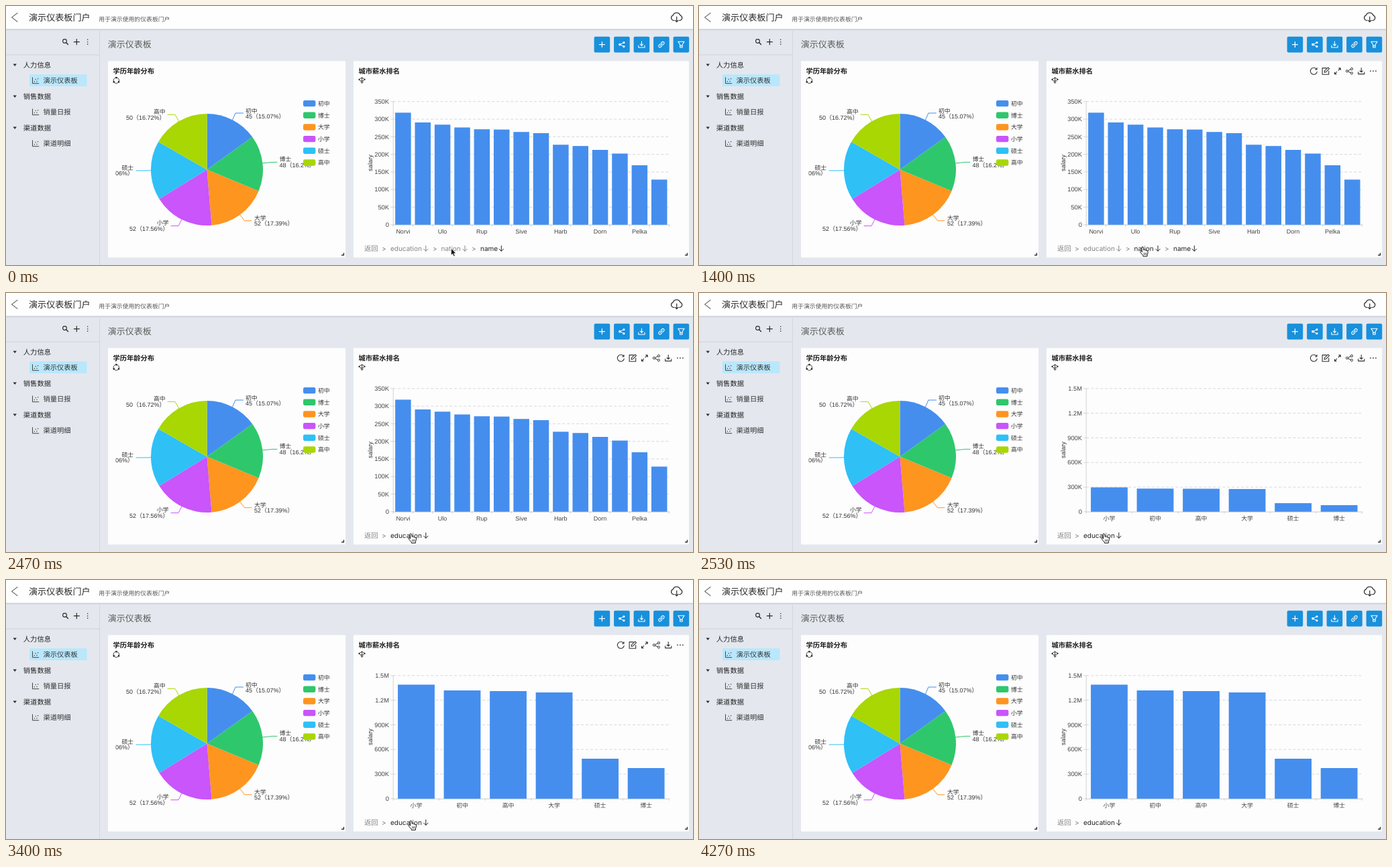
Animation, 1024 px wide and 387 px high, one loop 4.39 s. Source, as an HTML page:

```html
<!DOCTYPE html>
<html lang="zh-CN">
<head>
<meta charset="utf-8">
<title>演示仪表板门户</title>
<style>
html, body { margin: 0; width: 100%; height: 100%; overflow: hidden; background: #e4e8ee; }
svg { display: block; }
text { font-family: "Liberation Sans", "Noto Sans CJK SC", "Noto Sans CJK", sans-serif; text-rendering: geometricPrecision; white-space: pre; }
.ui { font-family: "Inter", "Noto Sans CJK SC", "Noto Sans CJK", sans-serif; }
.line { fill: none; stroke-linecap: round; stroke-linejoin: round; }
</style>
</head>
<body>
<svg id="stage" width="1024" height="387" viewBox="0 0 1024 387" xmlns="http://www.w3.org/2000/svg"></svg>
<script>
const LOOP = 4390, STEP = 1000 / 15;
const BLUE = '#458eee', INK = '#2b2b2b', GREY = '#858585';

const rect = (x, y, w, h, fill, rx = 0) =>
  `<rect x="${x}" y="${y}" width="${w}" height="${h}" fill="${fill}" rx="${rx}"/>`;
const line = (d, stroke, width = 1, extra = '') =>
  `<path class="line" d="${d}" stroke="${stroke}" stroke-width="${width}" ${extra}/>`;
const dot = (x, y, r, fill) => `<circle cx="${x}" cy="${y}" r="${r}" fill="${fill}"/>`;
const text = (x, y, size, fill, str, extra = '') =>
  `<text x="${x}" y="${y}" font-size="${size}" fill="${fill}" ${extra}>${str}</text>`;
const at = (x, y, body) => `<g transform="translate(${x} ${y})">${body}</g>`;
const END = 'text-anchor="end"', MID = 'text-anchor="middle"';

// Icons are centred on 0,0
const icon = {
  plus: c => line('M-4 0H4M0-4V4', c, 1.2),
  share: c => line('M3-3L-3 0L3 3', c) + dot(-3, 0, 1.8, c) + dot(3, -3, 1.6, c) + dot(3, 3, 1.6, c),
  shareOpen: c => line('M2-2.4L-2.2-.6M2 2.6L-2.2.7', c) +
    [[-3.6, 0], [3.4, -3.2], [3.4, 3.2]].map(([x, y]) =>
      `<circle cx="${x}" cy="${y}" r="1.6" fill="none" stroke="${c}"/>`).join(''),
  download: c => line('M-4.6 1.5V4.4H4.6V1.5M0-4.6V1.6M-2-.4L0 1.7L2-.4', c, 1.1),
  link: c => line('M-.8-2L1-3.8A2 2 0 0 1 3.8-1L2 .8M.8 2L-1 3.8A2 2 0 0 1-3.8 1L-2-.8M-1.4 1.4L1.4-1.4', c, 1.1),
  filter: c => line('M-4.6-4.4H4.6L1.7.2V4.4H-1.7V.2ZM-1.7 1.8H1.7', c, 1.1),
  reload: c => line('M4.2-2.6A5 5 0 1 0 4.9 1M4.6-4.6V-2.2H2.2', c, 1.1),
  edit: c => line('M1-4.6H-5V5H4.6V0M-2 2L-1.5-.5L3.6-5.4L5.4-3.6L.4 1.5Z', c, 1.1),
  expand: c => line('M1.2-1.2L4.4-4.4M1.8-4.4H4.4V-1.8M-1.2 1.2L-4.4 4.4M-1.8 4.4H-4.4V1.8', c, 1.1),
  more: c => [-4, 0, 4].map(x => dot(x, 0, .85, c)).join(''),
  chart: c => line('M-4.5-4.5V4.3H4.8', c, 1) +
    [[-1.6, 1.4], [.2, -2], [2, 1], [3.6, -2.6]].map(([x, y]) => dot(x, y, .75, c)).join(''),
  caret: c => `<path d="M-2.7-1.6H2.7L0 1.9Z" fill="${c}"/>`,
  down: c => line('M0-4V3.8M-3.2.8L0 4L3.2.8', c, 1)
};

function header() {
  return rect(0, 0, 1024, 34.3, '#fefefe') + rect(0, 34.3, 1024, 3, 'url(#shade)') +
    line('M17 10.5L8.6 17L17 23.5', '#777', 1.2) +
    text(34, 22.4, 13.1, '#262626', '演示仪表板门户') +
    text(138.3, 23.2, 8.85, '#555', '用于演示使用的仪表板门户') +
    at(999.7, 17, line('M-4 4.5H-5A4 4 0 0 1-5.4-3.2A5.6 5.6 0 0 1 5.2-3.2A4 4 0 0 1 5 4.5H4M0-1V6.6M-2.4 4.4L0 6.8L2.4 4.4', '#333', 1.25));
}

function sidebar() {
  const groups = [['人力信息', '演示仪表板'], ['销售数据', '销量日报'], ['渠道数据', '渠道明细']];
  return rect(139, 37, 1, 350, '#d3d7dd') + rect(0, 72.5, 139, 1, '#d0d4da') +
    at(88.5, 53.5, line('M1.2 1.2L4 4', INK, 1.4) + `<circle cx="-1" cy="-1" r="2.9" fill="none" stroke="${INK}" stroke-width="1.1"/>`) +
    at(105.3, 53.7, icon.plus(INK)) +
    [-3.4, 0, 3.4].map(y => dot(121.7, 53.7 + y, .8, INK)).join('') +
    rect(35, 102.3, 85.5, 17.8, '#b9e7fb', 1) +
    groups.map(([head, item], i) => {
      const y = 88 + i * 47;
      return at(13.2, y, icon.caret(INK)) +
        text(25.8, y + 3.6, 10.3, '#222', head, 'font-weight="500"') +
        at(44, y + 23.4, icon.chart('#444')) + text(55.4, y + 27, 10.3, '#333', item);
    }).join('');
}

function card(x, w, title) {
  return rect(x, 82.3, w, 293.5, '#fdfdfe', 1) +
    text(x + 7.4, 101, 10.3, '#1c1c1c', title, 'font-weight="700"') +
    line(`M${x + w - 5.4} 372.2H${x + w - 2.6}V369.4`, '#333', 1.4);
}

function pie() {
  const cx = 299.5, cy = 244.5, r = 83.5;
  // name, value, percent, colour, leader bend, leader end, text x, first baseline
  const parts = [
    ['初中', 45, 15.07, BLUE, 342, 160, 353.5, 357, 159.5],
    ['博士', 48, 16.2, '#2fc76c', 397, 233.4, 404, 407.5, 232.4],
    ['大学', 52, 17.39, '#fd951f', 355.5, 320.8, 366, 370, 319.6],
    ['小学', 52, 17.56, '#c955fb', 257, 328.6, 246, 242.5, 327.4],
    ['硕士', 51, 17.06, '#2fc0f6', 204, 246, 194, 190, 244.6],
    ['高中', 50, 16.72, '#a8d703', 252, 162.3, 241, 237.5, 161.2]
  ];
  const pt = p => {
    const a = p / 100 * 2 * Math.PI;
    return `${cx + r * Math.sin(a)} ${cy - r * Math.cos(a)}`;
  };
  let sum = 0, slices = '', labels = '', legend = '';
  parts.forEach(([name, value, pct, color, bx, by, ex, tx, ty], i) => {
    const anchor = tx < cx ? END : '';
    slices += `<path d="M${cx} ${cy}L${pt(sum)}A${r} ${r} 0 0 1 ${pt(sum + pct)}Z" fill="${color}"/>`;
    labels += line(`M${pt(sum + pct / 2)}L${bx} ${by}H${ex}`, color) +
      text(tx, ty, 8.8, '#333', name, anchor) +
      text(tx, ty + 8.6, 9, '#333', `${value}（${pct}%）`, anchor);
    const y = 145.6 + i * 17.68;
    legend += rect(443, y - 4.7, 18.4, 9.4, color, 2.4) + text(465, y + 3.4, 8.9, '#333', name);
    sum += pct;
  });
  const ring = [0, 1, 2].map(i => {
    const a = i * 2 * Math.PI / 3;
    return dot(4.2 * Math.sin(a), -4.2 * Math.cos(a), 1.3, INK);
  }).join('');
  return at(164.4, 111.3, `<circle r="4.2" fill="none" stroke="${INK}" stroke-width=".9"/>` + ring) +
    slices + `<g clip-path="url(#pieBox)">${labels}</g>` + legend;
}

const X0 = 577.2, X1 = 988.4, Y0 = 142.8, Y1 = 326.8;

function axes(ticks, count) {
  const gap = (Y1 - Y0) / (ticks.length - 1), step = (X1 - X0) / count;
  let out = '';
  ticks.forEach((t, i) => {
    const y = Y0 + i * gap;
    out += text(571, y + 3.2, 9.3, '#444', t, END) + line(`M573.5 ${y}H${X0}`, '#ccc', .8);
    if (i < ticks.length - 1)
      out += line(`M${X0} ${y}H${X1}`, '#d4d4d4', .9, 'stroke-dasharray="4 3" style="stroke-linecap:butt"');
  });
  out += line(`M${X0} ${Y0}V${Y1}`, '#d0d0d0', .9) + line(`M${X0} ${Y1 + .3}H${X1}`, '#c4c4c4', .9);
  for (let i = 0; i <= count; i++) out += line(`M${X0 + i * step} ${Y1}v2.6`, '#ccc', .8);
  return out;
}

function bars(tops, grow = 1) {
  const step = (X1 - X0) / tops.length;
  return tops.map((top, i) => {
    const h = (Y1 - top) * grow;
    return rect(X0 + (i + .1) * step, Y1 - h, step * .8, h, BLUE);
  }).join('');
}

function labels(names, y, size) {
  const step = (X1 - X0) / names.length;
  return names.map((n, i) => n && text(X0 + (i + .5) * step, y, size, '#444', n, MID)).join('');
}

const CITY_TOPS = [159.4, 174, 177.3, 181.5, 184.2, 184.6, 188.2, 190, 207.3, 209.2, 215, 220.5, 238, 259.4];
const LEVEL_TOPS = [156.4, 165, 166, 168, 267, 281];
const PEOPLE = ['Norvi', 'Ulo', 'Rup', 'Sive', 'Harb', 'Dorn', 'Pelka'].flatMap(n => [n, '']);
const LEVELS = ['小学', '初中', '高中', '大学', '硕士', '博士'];

const personChart = axes(['350K', '300K', '250K', '200K', '150K', '100K', '50K', '0'], 14) +
  bars(CITY_TOPS) + labels(PEOPLE, 340.2, 9);
const levelAxes = axes(['1.5M', '1.2M', '900K', '600K', '300K', '0'], 6) + labels(LEVELS, 340.4, 8.9);

function crumb(id, x, arrowX, str, color) {
  return `<g id="${id}" color="${color}">` + text(x, 365.8, 10, 'currentColor', str, 'class="ui"') +
    at(arrowX, 362.3, icon.down('currentColor')) + '</g>';
}
const sep = x => text(x, 365.8, 10, '#777', '&gt;', 'class="ui"');

function crumbs() {
  return text(534, 366, 10.3, GREY, '返回') + sep(560) +
    crumb('education', 573, 625.8, 'education', GREY) +
    `<g id="deeper">${sep(636)}${crumb('nation', 648.6, 684, 'nation', GREY)}` +
    `${sep(694)}${crumb('name', 707, 738.3, 'name', '#222')}</g>`;
}

const tools = ['reload', 'edit', 'expand', 'shareOpen', 'download', 'more']
  .map((n, i) => at(916.4 + i * 17.7, 97.2, icon[n]('#333'))).join('');
const buttons = ['plus', 'share', 'download', 'link', 'filter']
  .map((n, i) => at(888.4 + i * 29.5, 57.6, rect(-11.8, -11.8, 23.6, 23.6, '#1890dc', 2) + icon[n]('#fff'))).join('');

const arrow = '<path d="M0 0V10.6L2.4 8.4L4.1 12.2L6 11.4L4.3 7.7H7.6Z" fill="#111" stroke="#fff" stroke-width=".8"/>';
const hand = '<path d="M-1.3 1.2C-1.3-.3 1-.3 1.2 1.1L1.7 4.6C2.4 4 3.8 4.2 4 5.1C5 4.6 6 5 6.2 5.9C7.3 5.6 8.1 6.2 8.1 7.4C8.1 10 7.6 10.6 7 12V14H.9V12.7C-.8 11-2.2 9.1-3.2 7.9C-3.8 6.8-2.3 6-1.2 6.9L-.5 7.5Z" fill="#fff" stroke="#111" stroke-linejoin="round"/>' +
  line('M2.2 9V11.6M4 9V11.6M5.8 9V11.6', '#111', .7);

const stage = document.getElementById('stage');
stage.innerHTML = `<defs>
  <linearGradient id="shade" x2="0" y2="1"><stop stop-color="#c9cdd3"/><stop offset="1" stop-color="#e4e8ee"/></linearGradient>
  <clipPath id="pieBox"><rect x="163.3" y="130" width="332" height="225"/></clipPath></defs>` +
  rect(0, 0, 1024, 387, '#e4e8ee') + header() + sidebar() +
  text(151.8, 62, 13, '#5a5a5a', '演示仪表板') + buttons +
  card(152, 354, '学历年龄分布') + pie() + card(518, 500, '城市薪水排名') +
  at(530.6, 111, line('M-4.6-1.2L0-4L4.6-1.2L0 1.4ZM0-4V4M-2 2.2L0 4.2L2 2.2', INK, .9) + dot(-4, -1.2, 1, INK) + dot(4, -1.2, 1, INK)) +
  `<g id="tools">${tools}</g><g id="people">${personChart}</g>` +
  `<g id="levels">${levelAxes}<g id="levelBars"></g></g>` +
  text(0, 0, 9.3, '#333', 'salary', MID + ' transform="translate(546.4 234.5) rotate(-90)"') +
  crumbs() + `<g id="cursor"><g id="arrow">${arrow}</g><g id="hand">${hand}</g></g>`;

const el = id => document.getElementById(id);
const show = (id, on) => { el(id).style.display = on ? '' : 'none'; };
const ease = p => p * p * (3 - 2 * p);
const clamp = p => Math.min(1, Math.max(0, p));

// time, x, y of the pointer tip
const PATH = [[0, 663.4, 362], [70, 663.4, 362], [470, 666.4, 360], [930, 666.4, 360],
  [1400, 661, 360], [1930, 603.4, 359.6], [LOOP, 603.4, 359.6]];

function pointer(t) {
  const i = PATH.findIndex((p, n) => n && t <= p[0]);
  const [t0, x0, y0] = PATH[i - 1], [t1, x1, y1] = PATH[i];
  const p = ease((t - t0) / (t1 - t0));
  return [x0 + (x1 - x0) * p, y0 + (y1 - y0) * p];
}

function draw(t) {
  const [x, y] = pointer(t);
  const active = t >= 930 && t < 3530;
  const onEducation = active && x < 631;
  const onNation = active && x > 648;
  const drilled = t >= 2460, swapped = t >= 2530;

  show('tools', active);
  show('deeper', !drilled);
  show('people', !swapped);
  show('levels', swapped);
  el('education').setAttribute('color', onEducation || drilled ? '#222' : GREY);
  el('nation').setAttribute('color', onNation ? '#222' : GREY);
  if (swapped) el('levelBars').innerHTML = bars(LEVEL_TOPS, 1 - (1 - clamp((t - 2512.8) / 267)) ** 3);

  show('cursor', t < 3530);
  show('hand', onEducation || onNation);
  show('arrow', !onEducation && !onNation);
  el('cursor').setAttribute('transform', `translate(${x} ${y})`);
}

const start = performance.now();
function tick() {
  const t = (performance.now() - start) % LOOP;
  draw(Math.floor(t / STEP + .06) * STEP);
  requestAnimationFrame(tick);
}
tick();
</script>
</body>
</html>
```
